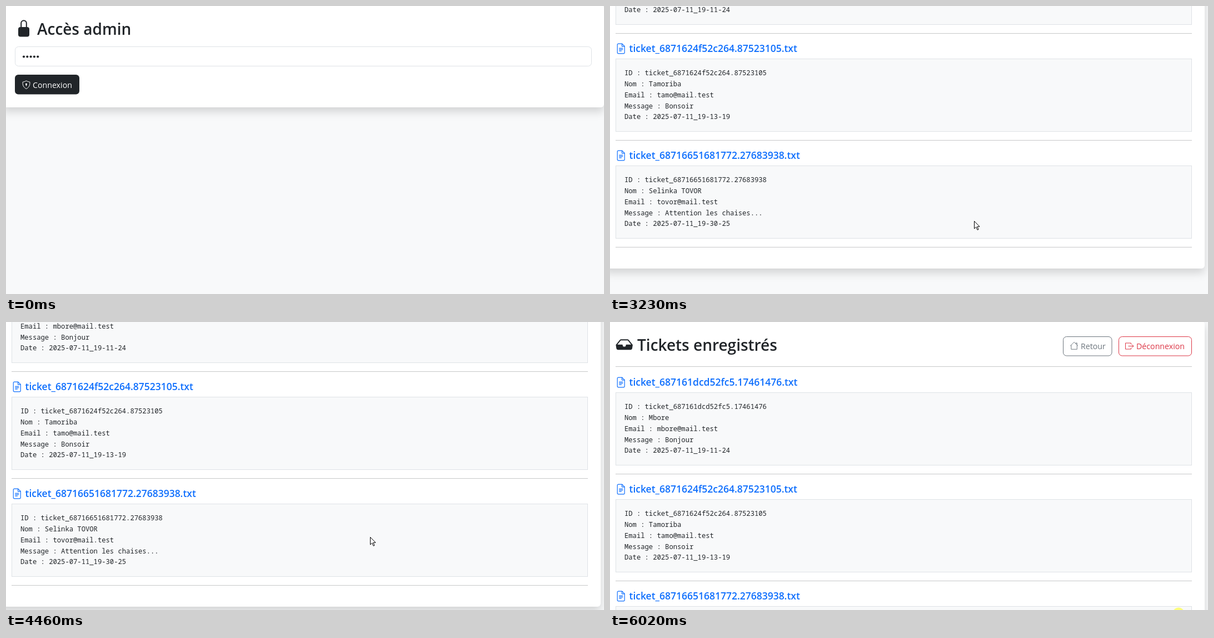
Write an HTML page that moves like this. It is 1076 by 520 pixels and loops after 6.27 s.

```html
<!DOCTYPE html>
<html lang="fr">
<head>
<meta charset="utf-8">
<title>Tickets</title>
<style>
  html, body { margin: 0; width: 100%; height: 100%; overflow: hidden; background: #f8f9fa; }
  svg { display: block; }
  text { font-family: "Open Sans", "Noto Sans", sans-serif; }
  .title { font-size: 28px; font-weight: 600; fill: #212529; }
  .file { font-size: 17.5px; font-weight: 600; fill: #0d6efd; }
  .label { font-size: 14.2px; }
  .mono { font: 12.19px "Noto Sans Mono", "DejaVu Sans Mono", monospace; fill: #212529; }
  .card { fill: #fff; filter: drop-shadow(0 8px 8px rgba(0, 0, 0, .15)); }
  .rule { stroke: #c7c8c9; }
  .icon { fill: none; stroke-linejoin: round; }
</style>
</head>
<body>
<svg id="stage" width="1076" height="520" viewBox="0 0 1076 520"></svg>
<script>
const LOOP = 6270, STEP = 68.3;
const DARK = '#212529', BLUE = '#0d6efd', GREY = '#6c757d', RED = '#dc3545';

const tickets = [
  ['687161dcd52fc5.17461476', 'Mbore', 'mbore@mail.test', 'Bonjour', '11-24'],
  ['6871624f52c264.87523105', 'Tamoriba', 'tamo@mail.test', 'Bonsoir', '13-19'],
  ['68716651681772.27683938', 'Selinka TOVOR', 'tovor@mail.test', 'Attention les chaises...', '30-25']
];

const text = (x, y, cls, s, fill = '') =>
  `<text x="${x}" y="${y}" class="${cls}" ${fill && `fill="${fill}"`}>${s}</text>`;
const box = (x, y, w, h, r, attrs) =>
  `<rect x="${x}" y="${y}" width="${w}" height="${h}" rx="${r}" ${attrs}/>`;
const icon = (x, y, scale, color, d) =>
  `<path class="icon" transform="translate(${x} ${y}) scale(${scale})" stroke="${color}" d="${d}"/>`;
const rule = y => `<path class="rule" d="M10 ${y}H1047"/>`;

function ticket([id, name, email, message, time], i) {
  const y = 193 * i;
  const lines = [`ID : ticket_${id}`, `Nom : ${name}`, `Email : ${email}`,
    `Message : ${message}`, `Date : 2025-07-11_19-${time}`];
  return icon(10.3, 99.5 + y, 1.18, BLUE,
      'M9.7.5H4A1.5 1.5 0 0 0 2.5 2v12A1.5 1.5 0 0 0 4 15.5h8a1.5 1.5 0 0 0 1.5-1.5V4.3z' +
      'M9.5.7V4.5h4M5 7.5h6M5 9.5h6M5 11.5h4') +
    text(34.5, 115 + y, 'file', `ticket_${id}.txt`) +
    box(10.5, 127.5 + y, 1036, 131, 0, 'fill="#f8f9fa" stroke="#dee2e6"') +
    lines.map((s, k) => text(26, 157 + y + 19.85 * k, 'mono', s)).join('') +
    rule(274.5 + y);
}

const login =
  box(-6, -2, 1082, 185, 6, 'class="card"') +
  box(22, 38, 20, 17.5, 4, `fill="${DARK}"`) +
  `<path class="icon" stroke="${DARK}" stroke-width="2" d="M27.2 39V31a4.8 4.8 0 0 1 9.6 0v8"/>` +
  text(56, 52, 'title', 'Accès admin') +
  box(16.5, 73.5, 1037, 35, 6, 'fill="#fff" stroke="#dee2e6"') +
  [0, 1, 2, 3, 4].map(i => `<circle cx="${32 + 6.3 * i}" cy="91.5" r="2.1" fill="${DARK}"/>`).join('') +
  '<path id="caret" d="M60 80V101" stroke="#000"/>' +
  box(16, 124, 116, 35.5, 6, `fill="${DARK}"`) +
  box(16, 124, 116, 35.5, 6, 'id="hover" fill="#424649"') +
  icon(36.5, 135, 1, '#fff', 'M0 0c2 1.3 4.5 2 6.3 2.2.6 6-1.5 10-6.3 12.3' +
    'c-4.8-2.3-6.9-6.3-6.3-12.3C-4.5 2-2 1.3 0 0z') +
  '<path d="M36.5 141V144.5" stroke="#fff" stroke-width="1.4"/><circle cx="36.5" cy="141" r="1.6" fill="#fff"/>' +
  text(48, 147.5, 'label', 'Connexion', '#fff');

const list =
  box(-12, -2, 1082, 701, 6, 'class="card"') +
  `<path transform="translate(10.5 25.5) scale(1.9)" fill="${DARK}" fill-rule="evenodd"
    d="M5 3h6q.8 0 1.2.6L16 8.3l-.5 3.4Q15.300 13 14 13H2Q.7 13 .5 11.700L0 8.300 3.800 3.600Q4.200 3 5 3z
       M4.700 4.100L1.500 8H6q.5 0 .5.5a1.500 1.500 0 0 0 3 0Q9.500 8 10 8h4.500L11.300 4.100z"/>` +
  text(49, 52, 'title', 'Tickets enregistrés') +
  box(815.5, 26.5, 87.5, 34.5, 6, `fill="none" stroke="${GREY}"`) +
  icon(827.5, 35.5, .95, GREY, 'M.8 8L8 .9 15.2 8M2.500 6.500V14.500h11V6.500M11.500 4.300V2.500h2v3.600') +
  text(847, 49, 'label', 'Retour', GREY) +
  box(915.5, 26.5, 131, 34.5, 6, `fill="none" stroke="${RED}"`) +
  icon(927, 35.500, 1, RED, 'M10.500 5V2.500H.500V13.500H10.500V11M5.500 8H15M12 5l3 3-3 3') +
  text(947, 49, 'label', 'Déconnexion', RED) +
  rule(80.5) + tickets.map(ticket).join('');

const $ = id => document.getElementById(id);
$('stage').innerHTML = `
  <g id="login">${login}</g>
  <g id="list">${list}</g>
  <g id="pointer">
    <circle id="click" cy="-.3" r="10.3" fill="#ff0"/>
    <path id="arrow" fill="#fff" stroke="#000" d="M.5.5v13.500l3.200-3 2.400 5.300 2-.9-2.400-5.100h4.300z"/>
    <path id="hand" fill="#fff" stroke="#000" stroke-width=".8" d="M-1.500 2a1.600 1.600 0 0 1 3.200 0v6l6 1.500
      q1.800.6 1.600 3l-.8 4.500-1 3h-8q-1.500-3.500-5-7.500c-.8-1.600 1-2.800 2.300-1.600l1.700 1.700z"/>
  </g>`;

// Keys are [time, x, y]
const pointerPath = [
  [70, 658, 389], [269, 658, 389], [270, 560, 345], [335, 482, 310], [599, 482, 310],
  [600, 460, 306], [740, 375, 288], [880, 280, 247], [1010, 205, 205], [1146, 125, 145],
  [1280, 118, 136], [2409, 118, 136], [2410, 200, 178], [2680, 655, 388], [5010, 655, 388],
  [5489, 1023, 526]
];
const scrollPath = [
  [3229, 0, 0], [3230, 0, -225], [3500, 0, -228], [3640, 0, -228], [4041, 0, 27],
  [4110, 0, 45], [4180, 0, 45], [4451, 0, -185], [4520, 0, -228], [4560, 0, -225],
  [4792, 28, 45], [5010, 28, 45], [5489, 0, 0]
];
const bursts = [0, 70, 270, 600, 1640, 1790, 2410, 3230, 3700, 5080, 6020];

const clamp = v => Math.max(0, Math.min(1, v));

function along(keys, t) {
  const next = keys.findIndex(k => k[0] > t);
  if (next < 0) return keys[keys.length - 1].slice(1);
  if (next === 0) return keys[0].slice(1);
  const a = keys[next - 1], b = keys[next], p = (t - a[0]) / (b[0] - a[0]);
  return [1, 2].map(i => Math.round(a[i] + (b[i] - a[i]) * p));
}

// The screen refreshes at a fixed step within each burst of activity
function snap(t) {
  const start = bursts.filter(b => b <= t).pop();
  return start + Math.floor((t - start) / STEP) * STEP;
}

const show = (id, on) => $(id).setAttribute('visibility', on ? 'visible' : 'hidden');
const fade = (id, v) => $(id).setAttribute('opacity', v);
const move = (id, p) => $(id).setAttribute('transform', `translate(${p})`);

function draw(now) {
  const t = snap(now % LOOP), onList = t >= 2410, overButton = t >= 1230 && !onList;
  $('login').style.display = onList ? 'none' : '';
  $('list').style.display = onList ? '' : 'none';
  $('pointer').style.display = t >= 70 ? '' : 'none';
  if (!onList) {
    show('caret', t >= 1640 && t < 1990);
    fade('hover', clamp((t - 1160) / 150));
  }
  show('arrow', !overButton);
  show('hand', overButton);
  fade('click', t >= 6020 ? .5 : t >= 1640 ? .5 * clamp(1 - (t - 1720) / 270) : 0);
  move('pointer', along(pointerPath, t));
  move('list', along(scrollPath, t));
  requestAnimationFrame(draw);
}
requestAnimationFrame(draw);
</script>
</body>
</html>
```
